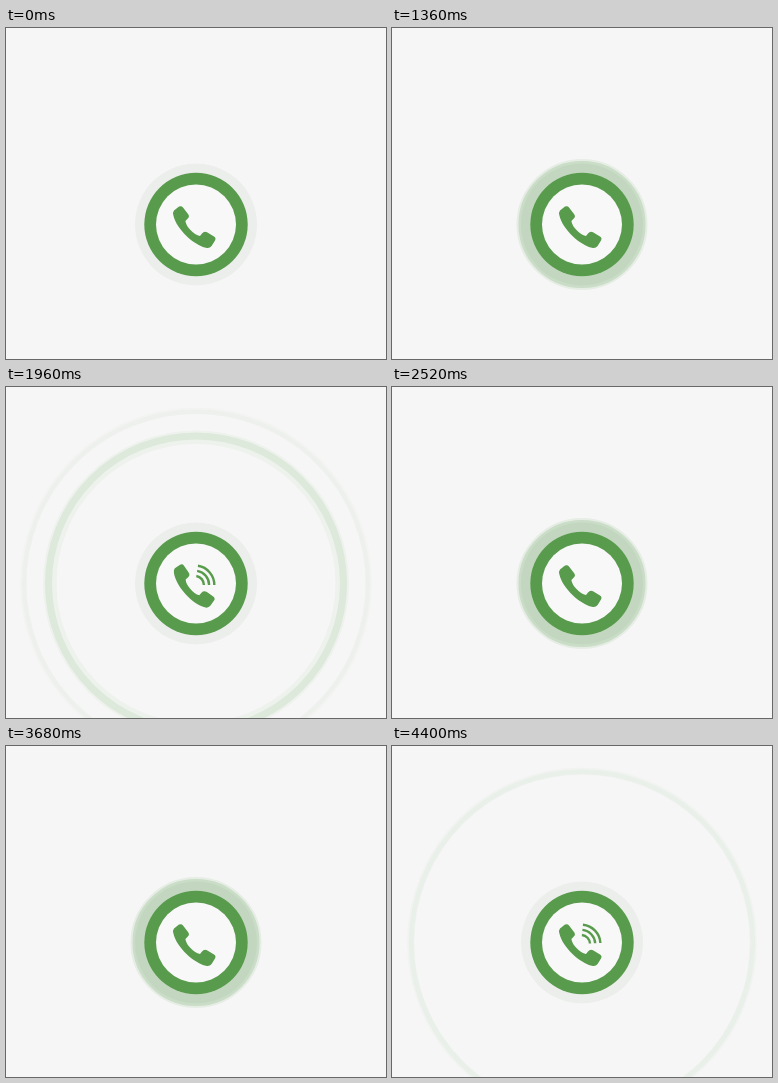
An HTML page with a canvas for the animation above (4640 ms loop, 380 by 331 pixels).

```html
<!DOCTYPE html>
<html lang="en">
<head>
<meta charset="utf-8">
<title>Ringing phone</title>
<style>
html, body { margin: 0; width: 100%; height: 100%; overflow: hidden; background: #f6f6f6; }
canvas { display: block; width: 380px; height: 331px; }
</style>
</head>
<body>
<canvas id="stage" width="380" height="331"></canvas>
<script>
const ctx = document.getElementById('stage').getContext('2d');
const CX = 190, CY = 196.5, GREEN = '#589b4c';
const CYCLE = 1160, STEP = 40, RING_DELAY = 140;

// Life of a ripple: age, outer radius, soft width, core width, opacity
const RIPPLE = [
  [140, 50, 10, 10, 0],
  [200, 65.5, 14, 13, .28],
  [240, 74.5, 22, 5, .25],
  [380, 114, 16, 6.5, .2],
  [520, 153, 13.5, 7, .16],
  [640, 175, 7.5, 4.5, .075],
  [720, 179, 5, 3, 0]
];

const handset = new Path2D(
  'M168 182.5L173 178.6Q175.4 177.4 177 179.4L182 186Q184 188.6 181.8 190.6' +
  'L179.4 193Q180 197.5 184.5 202Q189 207 194 208L196 205.4Q198 203 201 204.2' +
  'L208 208.4Q210.4 210 209 212.4L205.6 218Q203.6 220.6 200 219.8' +
  'C188 217 171 202 167.4 187.5Q166.6 184 168 182.5Z');

const ramp = (t, from, to) => Math.min(1, Math.max(0, (t - from) / (to - from)));

function rippleAt(age) {
  const i = RIPPLE.findIndex(row => row[0] > age);
  if (i < 1) return null;
  const a = RIPPLE[i - 1], b = RIPPLE[i];
  const k = ramp(age, a[0], b[0]);
  return a.map((v, n) => v + (b[n] - v) * k);
}

function disc(r, color) {
  ctx.fillStyle = color;
  ctx.beginPath();
  ctx.arc(CX, CY, r, 0, Math.PI * 2);
  ctx.fill();
}

function band(outer, width, alpha) {
  ctx.globalAlpha = alpha;
  ctx.lineWidth = width;
  ctx.beginPath();
  ctx.arc(CX, CY, outer - width / 2, 0, Math.PI * 2);
  ctx.stroke();
}

function drawRipple(age) {
  const ripple = rippleAt(age);
  if (!ripple) return;
  const [, radius, soft, core, alpha] = ripple;
  band(radius, soft, alpha * .35);
  band(radius - 2, core, alpha * .7);
}

function drawPhone(p) {
  const shake = 4 * Math.sin(ramp(p, 200, 840) * Math.PI * 5);
  ctx.save();
  ctx.translate(CX, CY);
  ctx.rotate(shake * Math.PI / 180);
  ctx.translate(-CX, -CY);
  ctx.fillStyle = GREEN;
  ctx.fill(handset);
  ctx.lineWidth = 2.4;
  for (let i = 0; i < 3; i++) {
    ctx.globalAlpha = ramp(p, 360 + i * 110, 460 + i * 110);
    ctx.beginPath();
    ctx.arc(189, 198, 9 + i * 5.2, -Math.PI / 2 + .1, -.05);
    ctx.stroke();
  }
  ctx.restore();
}

function draw(now) {
  const t = now % CYCLE;
  const p = t < 120 ? 0 : Math.min(920, Math.floor(t / STEP) * STEP);
  ctx.globalAlpha = 1;
  ctx.fillStyle = '#f6f6f6';
  ctx.fillRect(0, 0, 380, 331);
  disc(61, '#eceeec');
  ctx.strokeStyle = GREEN;
  for (let i = 0; i < 3; i++) drawRipple(p - i * RING_DELAY);
  ctx.globalAlpha = 1;
  disc(51.7, GREEN);
  disc(40, '#f8f8f8');
  drawPhone(p);
}

let start;
function frame(now) {
  start ??= now;
  draw(now - start);
  requestAnimationFrame(frame);
}
draw(0);
requestAnimationFrame(frame);
</script>
</body>
</html>
```
